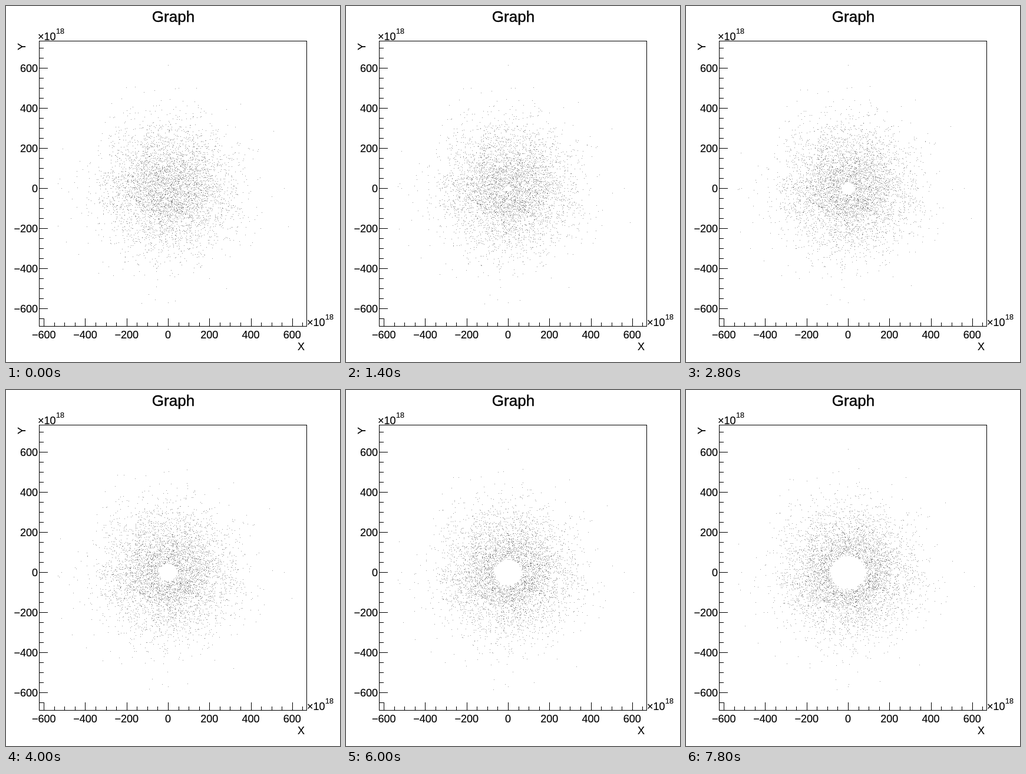
An HTML page with a canvas for the animation above (8 s loop, 567 by 604 pixels).

```html
<!DOCTYPE html>
<html lang="en">
<head>
<meta charset="utf-8">
<title>Graph</title>
<style>
  html, body { margin: 0; width: 100%; height: 100%; overflow: hidden; background: #fff; }
  canvas, svg { position: absolute; left: 0; top: 0; width: 567px; height: 604px; }
  text { font-family: "Liberation Sans", Arial, sans-serif; font-size: 18px; fill: #000; stroke: #000; stroke-width: .15; }
  .title { font-size: 26px; stroke-width: .4; }
  .power { font-size: 12.6px; }
  path { fill: none; stroke: #000; stroke-width: 1; shape-rendering: crispEdges; }
</style>
</head>
<body>
<canvas id="dots" width="567" height="604"></canvas>
<svg id="axes" viewBox="0 0 567 604"></svg>
<script>
const LOOP = 8000, STEP = 200, SPAN = 7800;
const BOX = { left: 56.5, top: 59.5, right: 510.5, bottom: 543.5 };
const toX = x => 275 + x * 0.3513;
const toY = y => 309 - y * 0.34;

// Axes and labels
const labels = [];
let lines = `M${BOX.left} ${BOX.top}H${BOX.right}V${BOX.bottom}H${BOX.left}Z`;

function label(x, y, text, anchor = "start", extra = "") {
  labels.push(`<text x="${x}" y="${y}" text-anchor="${anchor}" ${extra}>${text}</text>`);
}
function power(x, y) {
  label(x, y, "×10");
  label(x + 31, y - 11, "18", "start", 'class="power"');
}

for (let v = -650; v <= 700; v += 50) {
  const major = v % 200 === 0;
  const length = major ? 14 : 7;
  const name = String(v).replace("-", "−");
  const x = Math.round(toX(v)) + 0.5;
  const y = Math.round(toY(v)) + 0.5;
  lines += `M${BOX.left} ${y}h${length}`;
  if (major) label(54, y + 6.5, name, "end");
  if (x > BOX.left && x < BOX.right) {
    lines += `M${x} ${BOX.bottom}v${-length}`;
    if (major) label(toX(v), 563.5, name, "middle");
  }
}
label(284, 27, "Graph", "middle", 'class="title"');
label(501, 584, "X", "middle");
label(0, 0, "Y", "middle", 'transform="translate(33 69) rotate(-90)"');
power(54, 57.5);
power(511, 542.5);
document.getElementById("axes").innerHTML = `<path d="${lines}"/>` + labels.join("");

// Seeded random numbers
let seed = 20117;
function random() {
  seed = (seed + 0x6D2B79F5) | 0;
  let t = Math.imul(seed ^ (seed >>> 15), 1 | seed);
  t = (t + Math.imul(t ^ (t >>> 7), 61 | t)) ^ t;
  return ((t ^ (t >>> 14)) >>> 0) / 4294967296;
}
const gauss = () =>
  Math.sqrt(-2 * Math.log(1 - random())) * Math.cos(2 * Math.PI * random());

// Gaussian disc; every star starts off along its tangent
const COUNT = 4500, SIGMA = 155;
const stars = Array.from({ length: COUNT }, () => {
  const x = gauss() * SIGMA, y = gauss() * SIGMA, r = Math.hypot(x, y);
  const speed = 80 + 16 * random() + gauss() * r / 25;
  return { x, y, r, vx: -y / r * speed, vy: x / r * speed, speed };
});

const ctx = document.getElementById("dots").getContext("2d");
ctx.fillStyle = "rgba(0, 0, 0, .4)";
const dot = (x, y) => ctx.fillRect(Math.round(toX(x)), Math.round(toY(y)), 1, 1);

function draw(time) {
  const p = time / SPAN;
  ctx.clearRect(0, 0, 567, 604);
  for (const s of stars) {
    // weak pull keeps wide orbits nearly circular
    const keep = 1 - (s.speed * p) ** 2 / (2 * (s.r ** 2 + 90000));
    dot(s.x * keep + s.vx * p, s.y * keep + s.vy * p);
  }
  // four stars at rest mark the extent
  dot(0, 615);
  dot(0, -570);
  dot(-515, 0);
  dot(560, 0);
}

let shown = -1;
const start = performance.now();
function tick() {
  const time = Math.floor(((performance.now() - start) % LOOP) / STEP) * STEP;
  if (time !== shown) draw(shown = time);
  requestAnimationFrame(tick);
}
tick();
</script>
</body>
</html>
```
